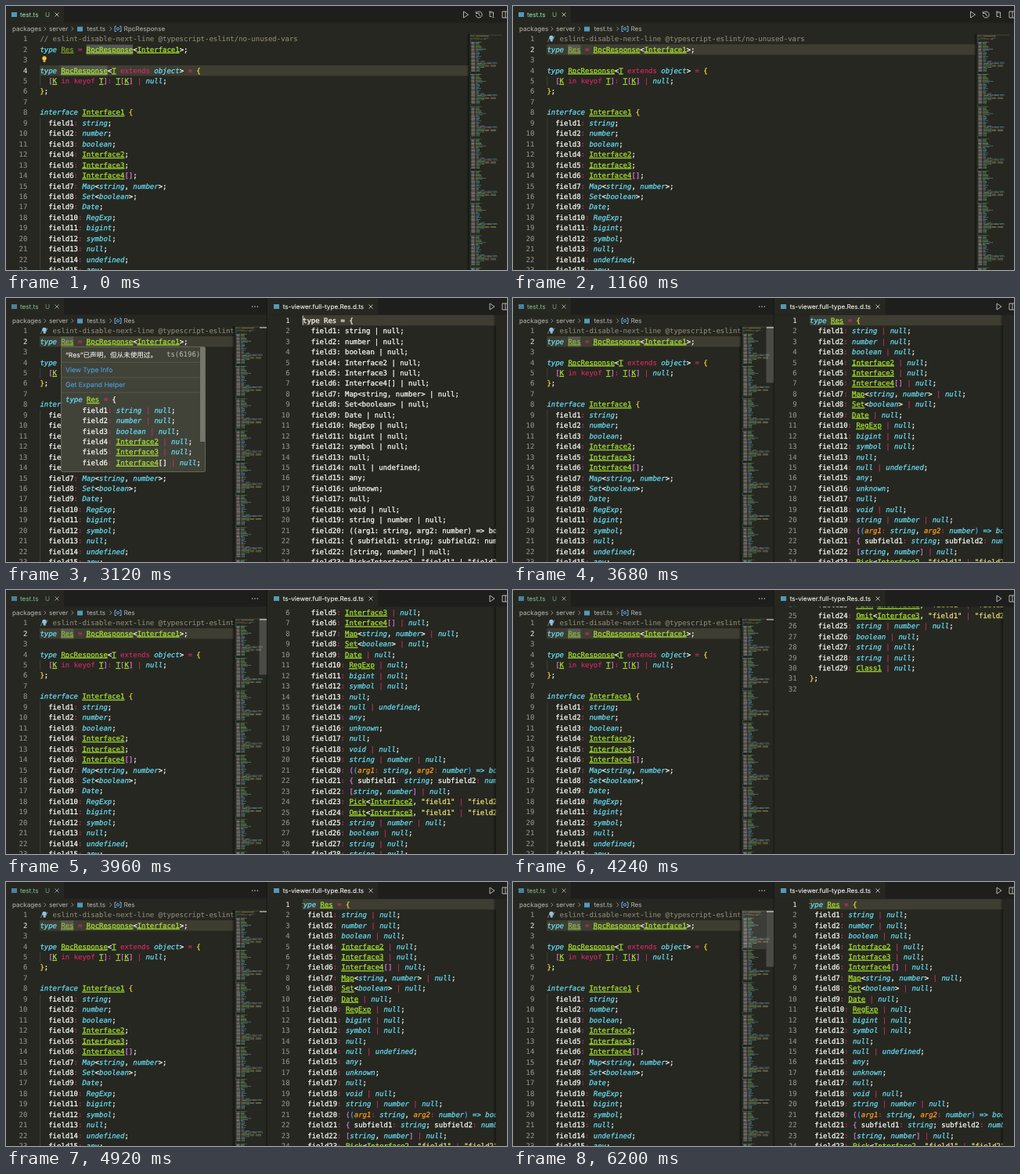
An HTML page that plays this animation: 640 px wide and 338 px high, repeating every 6240 ms.

```html
<!DOCTYPE html>
<html lang="zh">
<head>
<meta charset="utf-8">
<style>
html, body { margin: 0; width: 100%; height: 100%; overflow: hidden; background: #262721; }
svg { display: block; width: 640px; height: 338px; text-rendering: geometricPrecision; }
text { white-space: pre; }
text, tspan { fill: currentColor; stroke: currentColor; }
.code { font: 8.97px "DejaVu Sans Mono", "Liberation Mono", monospace; color: #f8f8f2; stroke-width: .28; }
.ui { font: 8.15px Inter, "Noto Sans", sans-serif; color: #a9a9a0; stroke-width: .1; }
.tip { font: 8.6px Inter, "Noto Sans CJK SC", "Noto Sans CJK", sans-serif; color: #f0f0ea; stroke-width: .1; }
.num { color: #90908a; text-anchor: end; stroke-width: .12; }
.link { color: #4a9fe0; }
.kw { color: #66d9ef; font-style: italic; }
.op { color: #e0286a; stroke-width: .1; }
.ty { color: #a6e22e; text-decoration: underline; }
.arg { color: #fd971f; font-style: italic; }
.str { color: #e6db74; }
.rem { color: #88846f; stroke-width: .15; }
.b1 { color: #f3d432; }
.b2 { color: #da70d6; }
.b3 { color: #3ea4f0; }
.dim { fill-opacity: .65; stroke-opacity: .5; }
.icon { fill: none; stroke: #c5c5c0; stroke-width: .9; }
</style>
</head>
<body>
<svg viewBox="0 0 640 338">
  <defs>
    <clipPath id="clipL"><rect id="clipLBox" y="36" width="591" height="302"/></clipPath>
    <clipPath id="clipR"><rect x="334" y="21.5" width="292" height="317"/></clipPath>
    <clipPath id="clipText"><rect x="378.5" width="248" height="800"/></clipPath>
    <linearGradient id="shade"><stop offset="0" stop-opacity="0"/><stop offset="1" stop-opacity=".45"/></linearGradient>
  </defs>
  <rect width="640" height="338" fill="#262721"/>
  <rect width="640" height="21.5" fill="#1e1f1c"/>

  <g id="left">
    <rect width="74" height="21.5" fill="#262721"/>
    <g id="tabL">
      <rect x="7" y="8" width="7" height="6" fill="#519aba"/>
      <text class="ui" x="18" y="13.7" style="color:#8fd0a0">test.ts</text>
      <text class="ui" x="50" y="13.7" style="color:#73a981">U</text>
      <path class="icon" d="M62.5 8.5l5 5m0-5l-5 5"/>
    </g>
    <text class="ui" x="8" y="32">packages</text>
    <text class="ui" x="55" y="32">server</text>
    <rect x="91" y="26.5" width="7" height="6" fill="#519aba"/>
    <text class="ui" x="103.5" y="32">test.ts</text>
    <path class="icon" stroke-opacity=".7" d="M48.5 26.7l2.4 2.5-2.4 2.5M83.5 26.7l2.4 2.5-2.4 2.5M132.5 26.7l2.4 2.5-2.4 2.5"/>
    <path class="icon" style="stroke:#75beff" d="M141 26h-2v6.5h2M145 26h2v6.5h-2M141.3 29.2a1.6 1.6 0 1 0 3.2 0a1.6 1.6 0 1 0 -3.2 0"/>
    <text class="ui" id="crumb" x="150.5" y="32"></text>
    <g clip-path="url(#clipL)">
      <rect id="lineL" x="43" width="548" height="13.45" fill="#3e3d32"/>
      <path d="M43.7 89.4v13.45M43.7 143.2v195" stroke="#464741" stroke-width=".8"/>
      <g fill="#565850">
        <g id="marksA"><rect x="102.5" y="49.5" width="59.5" height="13"/><rect x="70" y="76.4" width="59.5" height="13"/></g>
        <rect id="markB" x="70" y="49.5" width="16.3" height="13"/>
      </g>
      <g id="codeL"></g>
      <g id="bulb" fill="#ffcc33">
        <circle cx="49" cy="-1" r="2.7"/>
        <rect x="47.7" y="1.6" width="2.6" height="2.2"/>
      </g>
    </g>
    <g id="mapL">
      <rect x="588" y="36" width="4" height="302" fill="url(#shade)"/>
    </g>
  </g>

  <g id="actions" class="icon">
    <path d="M584.5 7l6 4-6 4z"/>
    <path d="M600.6 9.2a4 4 0 1 1-.4 2.4M600.3 6.8v2.7h2.7M604 8.5v2.8l2 1.2"/>
    <path d="M618 8v5.5h2.5M622.5 13.5V8h-2.5M617 7.2h2M621.5 14.5h2M620 6.5l-1.5 1.5 1.5 1.5"/>
    <path d="M641 7h-7v8h7M638 7v8"/>
  </g>

  <g id="right">
    <rect x="333" width="307" height="338" fill="#262721"/>
    <rect x="333" width="307" height="21.5" fill="#1e1f1c"/>
    <rect x="333.5" width="142" height="21.5" fill="#262721"/>
    <rect x="342" y="8" width="7" height="6" fill="#519aba"/>
    <text class="ui" x="353.7" y="13.7" style="color:#f4f4ee">ts-viewer.full-type.Res.d.ts</text>
    <path class="icon" d="M463.5 8.5l5 5m0-5l-5 5M618 7l6 4-6 4zM641 7h-7v8h7M638 7v8"/>
    <g fill="#c5c5c0"><circle cx="314.7" cy="11" r=".8"/><circle cx="318" cy="11" r=".8"/><circle cx="321.3" cy="11" r=".8"/></g>
    <g clip-path="url(#clipR)">
      <g id="scroll">
        <rect x="379" y="21.8" width="247" height="13.45" fill="#3e3d32"/>
        <g id="numR"></g>
        <g clip-path="url(#clipText)">
          <g id="pan">
            <g id="plainR"></g>
            <g id="codeR"></g>
            <rect id="caret" x="378.6" y="22.5" width="1" height="12" fill="#f8f8f0"/>
          </g>
        </g>
      </g>
    </g>
    <rect x="622" y="21.5" width="4" height="317" fill="url(#shade)"/>
    <rect x="332.6" width="1" height="338" fill="#171814"/>
    <rect x="324" y="37.2" width="9" height="1.4" fill="#b0b0a8"/>
    <g id="thumbL" fill="#fff">
      <rect id="sliderL" x="292" y="36.5" width="31" height="49.5" opacity=".1"/>
      <rect x="323.5" y="36.5" width="9.5" height="72" opacity=".17"/>
    </g>
  </g>

  <g id="tip">
    <rect x="70.5" y="62.5" width="184" height="160" rx="1.5" fill="#414339" stroke="#75715e" stroke-width=".8"/>
    <path d="M71 82.3h183M71 101.8h177M71 121h177" stroke="#5c5c4e" stroke-width=".7"/>
    <text class="tip" x="76" y="75.5">“Res”已声明，但从未使用过。</text>
    <text class="code" x="205" y="75.3" style="color:#b2b2a6;stroke-width:.1">ts(6196)</text>
    <text class="tip link" x="76" y="95">View Type Info</text>
    <text class="tip link" x="76" y="114.3">Get Expand Helper</text>
    <g id="tipCode"></g>
    <rect x="248" y="63" width="6.3" height="121" fill="#75766c"/>
  </g>
  <path id="beam" d="M79.5 51.5q1.7 0 1.7 1v7.5q0 1-1.7 1M83 51.5q-1.8 0-1.8 1M83 61q-1.8 0-1.8-1" fill="none" stroke="#fff" stroke-width=".9"/>
</svg>
<script>
const $ = id => document.getElementById(id);
const LOOP = 6240, ROW = 13.45, MAP_ROW = 1.29, MAP_COL = .67, MAX_SCROLL = 31 * ROW;

const shared = ['string', 'number', 'boolean', 'Interface2', 'Interface3', 'Interface4[]',
  'Map<string, number>', 'Set<boolean>', 'Date', 'RegExp', 'bigint', 'symbol', 'null', 'undefined',
  'any', 'unknown', 'null', 'void', 'string | number', '(arg1: string, arg2: number) => boolean',
  '{ subfield1: string; subfield2: number }', '[string, number]',
  'Pick<Interface2, "field1" | "field2">', 'Omit<Interface3, "field1" | "field2">',
  'string | number', 'boolean', 'string', 'string', 'Class1'];

const nullable = t => {
  if (t === 'undefined') return 'null | undefined';
  if (/^(null|any|unknown)$/.test(t)) return t;
  return (t.includes('=>') ? `(${t})` : t) + ' | null';
};
const fields = (types, pad) => types.map((t, i) => `${pad}field${i + 1}: ${t};`);
const block = n => [`interface Interface${n} {`, ...fields(shared, '  '), '}', ''];

const leftDoc = [
  '// eslint-disable-next-line @typescript-eslint/no-unused-vars',
  'type Res = RpcResponse<Interface1>;', '',
  'type RpcResponse<T extends object> = {', '  [K in keyof T]: T[K] | null;', '};', '',
  ...[1, 2, 3, 4, 5, 6, 7, 8].flatMap(block)];
const rightDoc = ['type Res = {', ...fields(shared.map(nullable), '  '), '};', ''];
const tipDoc = ['type Res = {', ...fields(shared.slice(0, 6).map(nullable), '    ')];

const KEYWORD = /^(type|interface|string|number|boolean|null|any|undefined|bigint|symbol|unknown|void|object)$/;
const BUILTIN = /^(Map|Set|Date|RegExp)$/;

function wordClass(w, linked) {
  if (KEYWORD.test(w)) return 'kw';
  if (/^(in|keyof|extends)$/.test(w)) return 'op';
  if (BUILTIN.test(w)) return linked ? 'ty' : 'kw';
  if (/^[A-Z]/.test(w)) return 'ty';
  return /^arg/.test(w) ? 'arg' : '';
}

// Splits lines into [text, class] pairs; bracket colours follow nesting depth.
function tokenize(lines, { linked = false, brackets = true } = {}) {
  let depth = 0;
  const classify = s => {
    if (s.startsWith('//')) return 'rem';
    if (s[0] === '"') return 'str';
    if (s === '=>') return 'kw';
    if (/^\w/.test(s)) return wordClass(s, linked);
    if (/^[:|=]$/.test(s)) return 'op';
    if (!brackets) return '';
    if (/^[{([]$/.test(s)) return 'b' + (depth++ % 3 + 1);
    if (/^[})\]]$/.test(s)) return 'b' + (--depth % 3 + 1);
    return '';
  };
  return lines.map(l => (l.match(/\/\/.*|"[^"]*"|=>|\w+|\s+|./g) || []).map(s => [s, classify(s)]));
}

const esc = s => s.replace(/&/g, '&amp;').replace(/</g, '&lt;').replace(/>/g, '&gt;');
const span = ([s, c]) => c ? `<tspan class="${c}">${esc(s)}</tspan>` : esc(s);

function codeRows(rows, x, y) {
  return rows.map((r, i) => `<text class="code" x="${x}" y="${y + i * ROW}">${r.map(span).join('')}</text>`).join('');
}
function numbers(count, x, y, id) {
  return Array.from({ length: count }, (_, i) =>
    `<text class="code num" id="${id}${i + 1}" x="${x}" y="${y + i * ROW}">${i + 1}</text>`).join('');
}
function minimap(rows, x, y) {
  const paths = {};
  rows.forEach((r, i) => {
    let col = 0;
    for (const [s, c] of r) {
      const w = (s.length * MAP_COL).toFixed(2);
      if (s.trim()) paths[c] = (paths[c] || '') +
        `M${(x + col * MAP_COL).toFixed(2)} ${(y + i * MAP_ROW).toFixed(2)}h${w}v.8h-${w}z`;
      col += s.length;
    }
  });
  return Object.entries(paths).map(([c, d]) =>
    `<path class="${c}" d="${d}" fill="${c ? 'currentColor' : '#f8f8f2'}" opacity=".42"/>`).join('');
}

const leftRows = tokenize(leftDoc);
const shown = leftRows.slice(0, 23);
shown[1] = shown[1].map(([s, c]) => [s, s === 'Res' ? 'ty dim' : c]);
$('codeL').innerHTML = numbers(23, 27.3, 45.2, 'l') + codeRows(shown, 43.4, 45.2);
$('mapL').insertAdjacentHTML('beforeend', minimap(leftRows.slice(0, 234), 593, 36.8));

$('plainR').innerHTML = codeRows(rightDoc.map(l => [[l, '']]), 379, 31.7);
$('codeR').innerHTML = codeRows(tokenize(rightDoc, { linked: true }), 379, 31.7);
$('numR').innerHTML = numbers(32, 362.6, 31.7, 'r');
$('r1').style.color = '#e0e0da';
$('tipCode').innerHTML = codeRows(tokenize(tipDoc, { brackets: false }), 76, 133.2);

const show = (id, on) => $(id).setAttribute('visibility', on ? 'visible' : 'hidden');
const within = (t, a, b) => t >= a && t < b;
const ease = (t, a, b) => {
  const u = Math.min(1, Math.max(0, (t - a) / (b - a)));
  return u * u * (3 - 2 * u);
};

function draw(t) {
  const onRes = t >= 960, split = t >= 3120, colored = t >= 3240;
  const line = onRes ? 2 : 4;
  $('crumb').textContent = onRes ? 'Res' : 'RpcResponse';
  $('lineL').setAttribute('y', 35.6 + (line - 1) * ROW);
  $('l2').style.color = onRes ? '#e0e0da' : '';
  $('l4').style.color = onRes ? '' : '#e0e0da';
  $('bulb').setAttribute('transform', `translate(0 ${onRes ? 41.5 : 68})`);
  $('bulb').setAttribute('fill', onRes ? '#8fc3e8' : '#ffcc33');
  show('marksA', !onRes);
  show('markB', onRes);
  show('beam', within(t, 1320, 2320));
  show('tip', within(t, 1720, 3480));

  $('right').setAttribute('display', split ? 'inline' : 'none');
  $('actions').setAttribute('display', split ? 'none' : 'inline');
  $('clipLBox').setAttribute('width', split ? 291 : 591);
  $('mapL').setAttribute('transform', `translate(${split ? -300 : 0} 0)`);
  $('tabL').setAttribute('opacity', split ? .8 : 1);
  show('plainR', !colored);
  show('codeR', colored);
  show('caret', within(t, 3120, 3640));

  // The swipe back up also drags the text slightly sideways.
  const back = ease(t, 4446, 4900);
  $('scroll').setAttribute('transform', `translate(0 ${-MAX_SCROLL * (ease(t, 3796, 4446) - back)})`);
  $('pan').setAttribute('transform', `translate(${-4.5 * back} 0)`);
  show('thumbL', within(t, 3480, 4100) || t >= 5680);
  show('sliderL', t >= 5680);
}

const start = performance.now();
function tick() {
  draw((performance.now() - start) % LOOP);
  requestAnimationFrame(tick);
}
draw(0);
requestAnimationFrame(tick);
</script>
</body>
</html>
```
